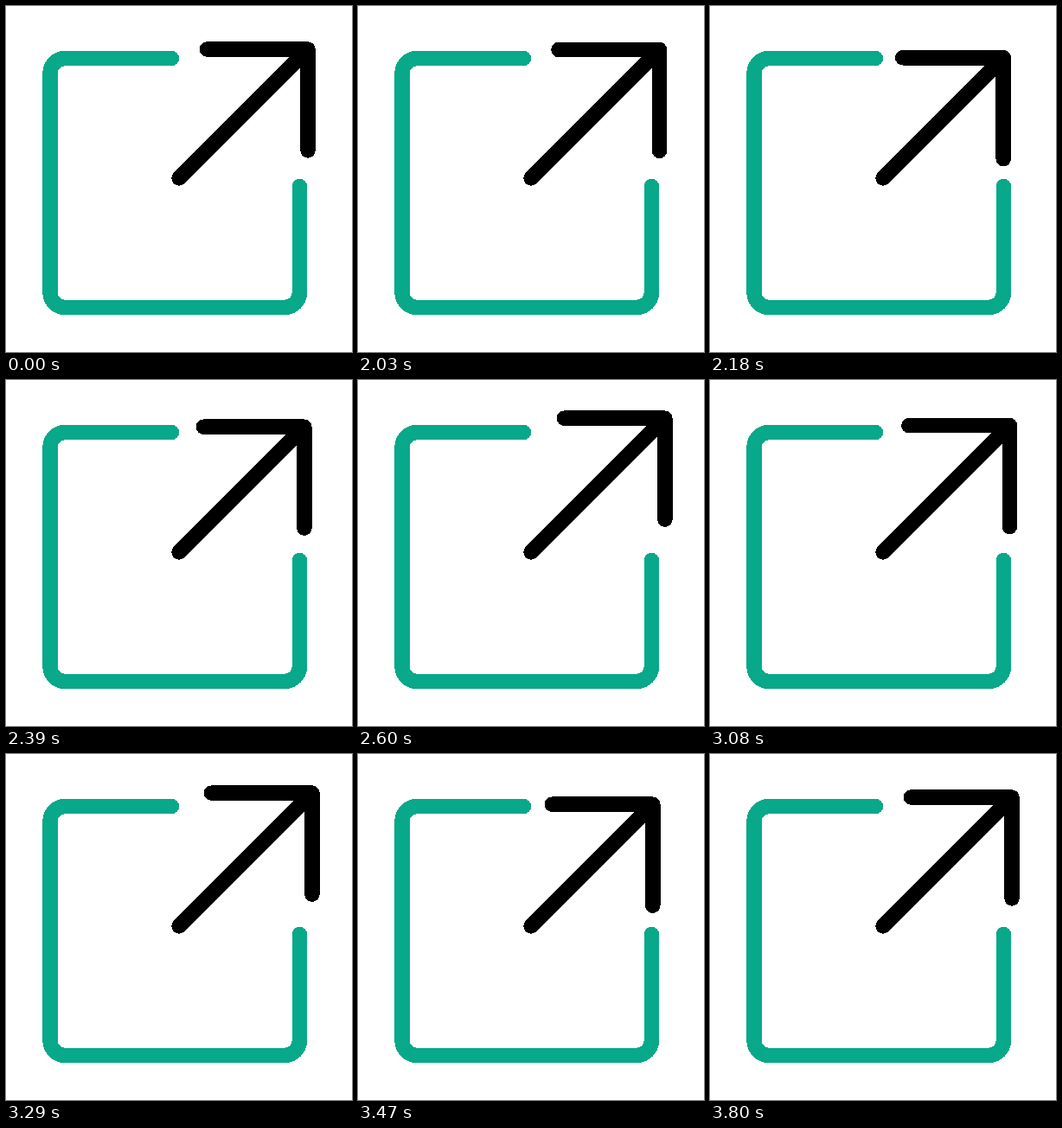
Animation of 400x400 px, one loop 3.83 s. Source, as an HTML page:

```html
<!DOCTYPE html>
<html lang="en">
<head>
<meta charset="utf-8">
<title>Open in new window</title>
<style>
  html, body { margin: 0; width: 100%; height: 100%; overflow: hidden; background: #fff; }
  svg { display: block; width: 100%; height: 100%; }
  path {
    fill: none;
    stroke-width: 17.5;
    stroke-linecap: round;
    stroke-linejoin: round;
    shape-rendering: crispEdges;
  }
  .frame { stroke: #08a88a; }
  .arrow { stroke: #000; }
</style>
</head>
<body>
<svg viewBox="0 0 400 400">
  <path class="frame" d="M191.5 60.5H68.5a17.5 17.5 0 0 0-17.5 17.5V331a17.5 17.5 0 0 0 17.5 17.5H322a17.5 17.5 0 0 0 17.5-17.5V208.5"/>
  <path class="arrow" d="M232.5 50H349V167M349 50L200 199"/>
</svg>
<script>
  const LOOP = 3830, START = 2000, STEP = 30;
  // [step, distance outward along the diagonal]
  const KEYS = [[0, 0], [8, -11.6], [19.2, 6.1], [30.6, -11.6], [41.3, 6.1], [52, -11.6], [60, 0]];
  const arrow = document.querySelector('.arrow');

  const smooth = x => x * x * (3 - 2 * x);

  function offsetAt(ms) {
    // The arrow holds each pose for one step.
    const step = Math.floor((ms - START) / STEP);
    if (step <= 0 || step >= 60) return 0;
    const i = KEYS.findIndex(key => key[0] > step);
    const [s0, v0] = KEYS[i - 1], [s1, v1] = KEYS[i];
    return v0 + (v1 - v0) * smooth((step - s0) / (s1 - s0));
  }

  function draw(now) {
    const shift = offsetAt(now % LOOP);
    const x = 349 + shift, y = 50 - shift;
    arrow.setAttribute('d', `M${x - 116.5} ${y}H${x}V${y + 117}M${x} ${y}L200 199`);
    requestAnimationFrame(draw);
  }

  requestAnimationFrame(draw);
</script>
</body>
</html>
```
